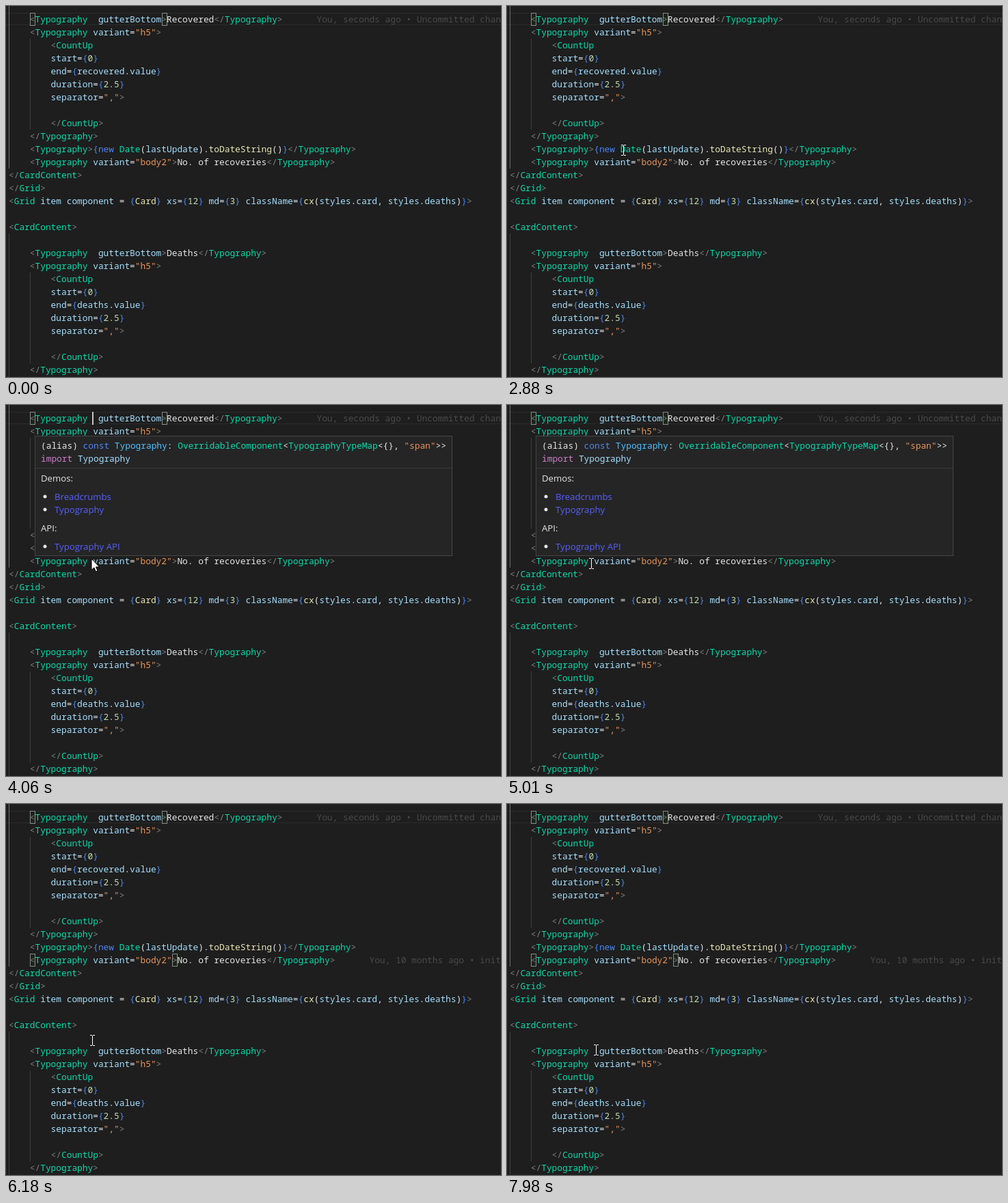
An HTML page with a canvas for the animation above (8000 ms loop, 724x543 px).

```html
<!DOCTYPE html>
<html lang="en">
<head>
<meta charset="utf-8">
<title>Multi-cursor editing</title>
<style>
html, body { margin: 0; width: 100%; height: 100%; overflow: hidden; background: #1e1e1e; }
canvas { display: block; }
</style>
</head>
<body>
<canvas id="stage" width="724" height="543"></canvas>
<script>
const stage = document.getElementById('stage');
const ctx = stage.getContext('2d');
const LOOP = 8000, STEP = 78.44, ENTER = 450;
const LEFT = 4, TOP = 10, ROW = 19, CHAR = 7.7;
const MONO = '500 12.833px "Noto Sans Mono", "DejaVu Sans Mono", monospace';
const SANS = '13.2px "Open Sans", "Noto Sans", sans-serif';
const C = {
  text: '#e6e6e6', gray: '#808080', teal: '#06dcae', attr: '#a4e0ff', string: '#e8965a',
  blue: '#4a86f4', number: '#c0dcae', func: '#e8e8b4', constant: '#4fc1ff',
  purple: '#d07fca', link: '#5560ff', faint: '#4a4a4a'
};

// Code and its colours
const card = (title, value) => `    <Typography  gutterBottom>${title}</Typography>
    <Typography variant="h5">
        <CountUp
        start={0}
        end={${value}.value}
        duration={2.5}
        separator=",">

        </CountUp>
    </Typography>`;
const lines = `${card('Recovered', 'recovered')}
    <Typography>{new Date(lastUpdate).toDateString()}</Typography>
    <Typography variant="body2">No. of recoveries</Typography>
</CardContent>
</Grid>
<Grid item component = {Card} xs={12} md={3} className={cx(styles.card, styles.deaths)}>

<CardContent>

${card('Deaths', 'deaths')}`.split('\n');
const RECOVERED = 0;
const RECOVERIES = lines.findIndex(line => line.includes('body2'));
const DEATHS = lines.findIndex(line => line.includes('>Deaths<'));

const rules = [
  [/^(<\/?|>)/, C.gray],
  [/^"[^"]*"/, C.string],
  [/^(Typography|CountUp|CardContent|Grid|Date)\b/, C.teal],
  [/^(new\b|[{}])/, C.blue],
  [/^[\d.]*\d/, C.number],
  [/^(toDateString|cx|Card)\b/, C.func],
  [/^(Recovered|Deaths|No\. of recoveries)/, C.text],
  [/^\w+/, C.attr],
  [/^./, C.text]
];

function tokenize(line) {
  const tokens = [];
  while (line) {
    const [pattern, color] = rules.find(([p]) => p.test(line));
    const text = line.match(pattern)[0];
    tokens.push([text, color]);
    line = line.slice(text.length);
  }
  return tokens;
}
const code = lines.map(tokenize);

const signature = [
  ['(alias) ', C.text], ['const ', C.blue], ['Typography', C.constant], [': ', C.text],
  ['OverridableComponent', C.teal], ['<', C.text], ['TypographyTypeMap', C.teal],
  ['<{}, ', C.text], ['"span"', C.string], ['>>', C.text]
];
const importLine = [['import ', C.purple], ['Typography', C.attr]];
const docs = { 'Demos:': ['Breadcrumbs', 'Typography'], 'API:': ['Typography API'] };

// Key points of the pointer: time, x, y
const path = [
  [ENTER, 676, 518], [1230, 141, 18], [1860, 129, 18], [2345, 124, 18], [2750, 190, 170],
  [3200, 126, 310], [3905, 125, 224], [5010, 124, 232], [5620, 124, 232],
  [6330, 128, 377], [6650, 122, 360], [7680, 122, 360], [LOOP, 132, 360]
];

const during = (t, from, to) => t >= from && t < to;
const colX = col => Math.ceil(LEFT + col * CHAR);
const rowY = row => TOP + row * ROW;

function rect(x, y, w, h, color) {
  ctx.fillStyle = color;
  ctx.fillRect(x, y, w, h);
}

function label(text, x, y, color, font = MONO) {
  ctx.font = font;
  ctx.fillStyle = color;
  ctx.fillText(text, x, y);
}

function drawTokens(tokens, x, y) {
  for (const [text, color] of tokens) {
    label(text, x, y, color);
    x += text.length * CHAR;
  }
}

function drawNote(row, text) {
  const indent = LEFT + lines[row].length * CHAR;
  label(text, indent + 6.5 * CHAR, rowY(row) + 14, C.faint);
}

function drawBrackets(row) {
  for (const bracket of '<>') {
    const x = colX(lines[row].indexOf(bracket)), y = rowY(row);
    rect(x, y, 8, ROW, 'rgba(0,100,0,.1)');
    ctx.strokeStyle = '#888';
    ctx.strokeRect(x + .5, y + .5, 7, ROW - 1);
  }
}

function drawEditor(t) {
  rect(0, 0, stage.width, stage.height, '#1e1e1e');
  for (const y of [TOP, TOP + ROW - 2]) rect(0, y, stage.width, 1, '#2a2a2a');
  rect(LEFT, 0, 1, rowY(RECOVERIES + 1), '#707070');
  rect(LEFT, rowY(DEATHS - 1), 1, stage.height, '#404040');
  for (const row of [RECOVERED, DEATHS]) rect(colX(4), rowY(row + 2), 1, 7 * ROW, '#404040');
  if (during(t, 7035, 7345)) rect(colX(5) - 1, rowY(DEATHS), 10 * CHAR, ROW, '#1e303e');

  code.forEach((tokens, row) => drawTokens(tokens, LEFT, rowY(row) + 14));
  drawNote(RECOVERED, 'You, seconds ago • Uncommitted changes');
  drawBrackets(RECOVERED);
  if (t >= 5395) {
    drawNote(RECOVERIES, 'You, 10 months ago • initial');
    drawBrackets(RECOVERIES);
  }
}

function drawCarets(t) {
  const multi = t >= 5315;
  const clicked = multi ? 5305 : 2005;
  if (t < clicked || Math.floor((t - clicked) / 500) % 2) return;
  const caret = (row, col) => rect(colX(col) - 2, rowY(row), 2, ROW, '#c4c4c2');
  caret(RECOVERED, 16);
  if (multi) caret(RECOVERIES, 15);
}

// Documentation box that sits on top of the given row
function drawHover(row) {
  ctx.save();
  ctx.translate(42, rowY(row) - 174);
  rect(0, 0, 611, 176, '#454545');
  rect(1, 1, 609, 174, '#252526');
  rect(1, 47, 609, 1, '#3c3c3c');
  drawTokens(signature, 9, ROW);
  drawTokens(importLine, 9, 2 * ROW);
  let y = 67;
  for (const [heading, links] of Object.entries(docs)) {
    label(heading, 9, y, C.text, SANS);
    y += 8;
    for (const link of links) {
      y += ROW;
      ctx.beginPath();
      ctx.arc(15, y - 5, 2.5, 0, 7);
      ctx.fillStyle = C.text;
      ctx.fill();
      label(link, 29, y, C.link, SANS);
    }
    y += 27;
  }
  ctx.restore();
}

function pointerAt(t) {
  const i = path.findIndex(([end]) => end > t);
  const [t0, ...from] = path[i - 1], [t1, ...to] = path[i];
  const k = (t - t0) / (t1 - t0);
  return from.map((v, axis) => Math.round(v + (to[axis] - v) * k));
}

function drawArrow(x, y) {
  const shape = new Path2D('M0 0V16.5L3.8 13L6.4 18.8L9 17.7L6.5 12H11.5Z');
  ctx.save();
  ctx.translate(x, y);
  ctx.fillStyle = '#fff';
  ctx.strokeStyle = '#000';
  ctx.fill(shape);
  ctx.stroke(shape);
  ctx.restore();
}

function drawIBeam(x, y) {
  rect(x - 1, y - 7, 1, 14, '#fff');
  for (const end of [y - 8, y + 7]) {
    rect(x - 4, end, 3, 1, '#fff');
    rect(x, end, 3, 1, '#fff');
  }
}

function draw(now) {
  // The screen refreshes in even steps, counted from the pointer's entry.
  const steps = Math.floor((now % LOOP - ENTER + 3) / STEP);
  const t = ENTER + steps * STEP;
  drawEditor(t);
  drawCarets(t);
  if (during(t, 4055, 5315)) drawHover(RECOVERIES);
  if (during(t, 7115, 7345)) drawHover(DEATHS);
  if (t >= ENTER) {
    const drawPointer = during(t, 3900, 4530) ? drawArrow : drawIBeam;
    drawPointer(...pointerAt(t));
  }
}

const start = performance.now();
function frame() {
  draw(performance.now() - start);
  requestAnimationFrame(frame);
}
frame();
</script>
</body>
</html>
```
